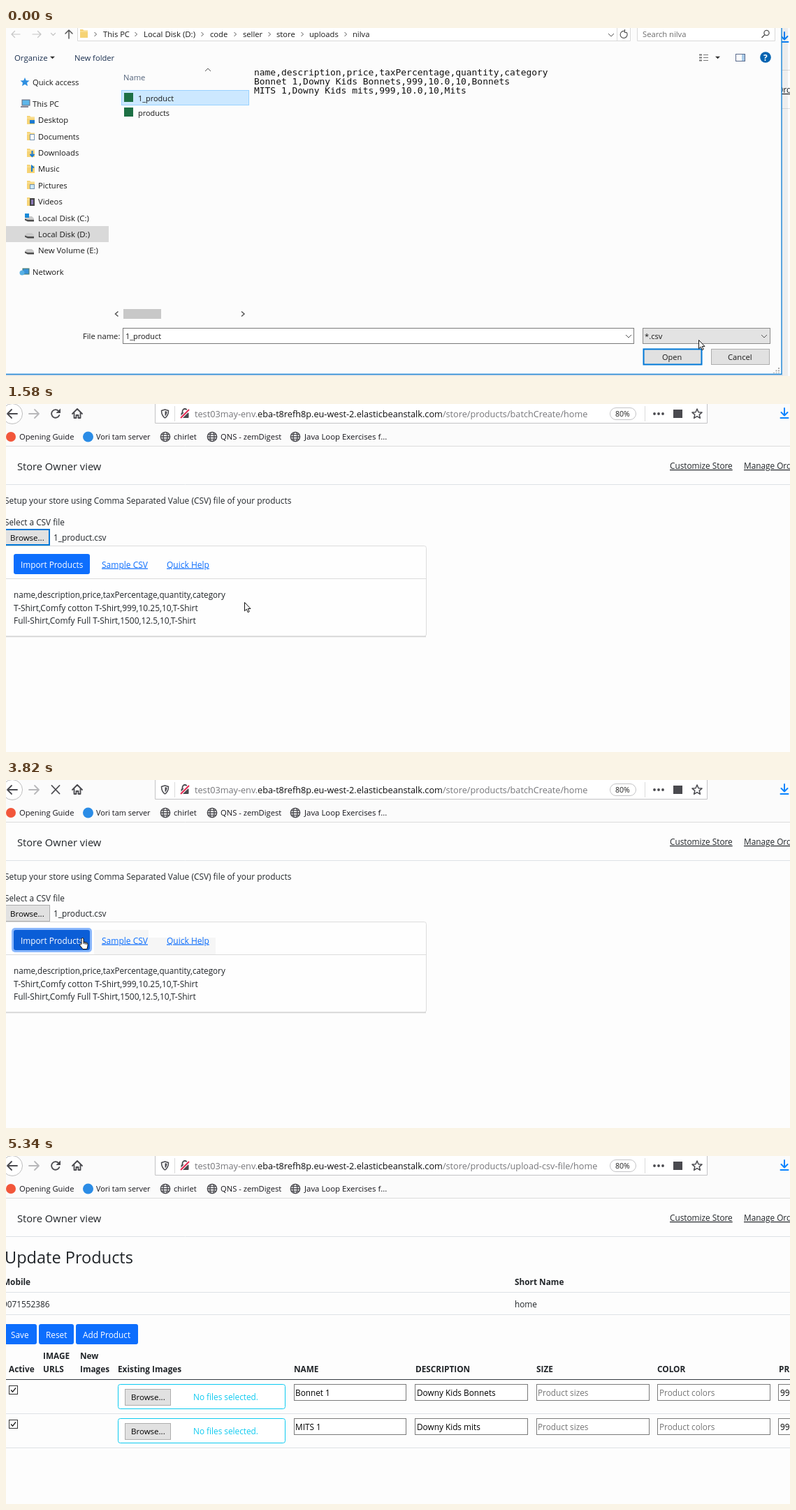
Animation of 1122x499 px, one loop 6010 ms. Source, as an HTML page:

```html
<!DOCTYPE html>
<html lang="en">
<head>
<meta charset="utf-8">
<title>Batch product upload</title>
<style>
html, body { margin: 0; width: 100%; height: 100%; overflow: hidden; background: #fdfdfd; }
svg { display: block; width: 1122px; height: 499px; }
text { font-family: "Open Sans", "Noto Sans", sans-serif; white-space: pre; }
.ui { font-size: 11.2px; fill: #191919; }
.files { font-size: 10.9px; }
.mono text { font: 12.95px "DejaVu Sans Mono", monospace; fill: #111; }
.marks { font-size: 11.2px; fill: #15141a; }
.url { font-size: 12.7px; fill: #76767a; }
.url tspan { fill: #0c0c0d; }
.page { font-size: 11.8px; fill: #212529; }
.csv { font-size: 11.95px; }
.bold { font-weight: 700; }
.link { text-decoration: underline; }
.blue { fill: #0d6efd; }
.white { fill: #fff; }
.hint { fill: #757575; }
.cyan { fill: #0dcaf0; }
.line { fill: none; stroke: #4a4a4f; stroke-width: 1.8; stroke-linecap: round; stroke-linejoin: round; }
.rule { stroke: #dee2e6; }
.thin { fill: none; stroke: #555; }

.step { animation: 6010ms step-end infinite; }
.dialog { animation-name: dialog; }
@keyframes dialog { 0% { opacity: 1 } 10.81%, 100% { opacity: 0 } }
.pressed { animation-name: pressed; }
@keyframes pressed { 0% { opacity: 0 } 8.48%, 100% { opacity: 1 } }
.picked { animation-name: picked; }
@keyframes picked {
  0% { fill: #cce8ff; stroke: #99d1ff }
  8.48%, 100% { fill: #d9d9d9; stroke: #d9d9d9 }
}
.combo { animation-name: combo; }
@keyframes combo { 0% { stroke: #8c8c8c } 1.99%, 100% { stroke: #adadad } }
.open { animation-name: open; }
@keyframes open {
  0% { fill: #e1e1e1; stroke: #0078d7; stroke-width: 2px }
  3.99% { fill: #e5f1fb; stroke: #0078d7; stroke-width: 1px }
  8.48%, 100% { fill: #cce4f7; stroke: #005499; stroke-width: 1px }
}
.before { animation-name: before; }
@keyframes before { 0% { opacity: 1 } 74.87%, 100% { opacity: 0 } }
.after { animation-name: after; }
@keyframes after { 0% { opacity: 0 } 74.87%, 100% { opacity: 1 } }
.import { animation-name: import; }
@keyframes import { 0% { fill: #0d6efd } 34.77%, 100% { fill: #0b5ed7 } }
.ring { animation-name: ring; }
@keyframes ring { 0% { opacity: 0 } 47.91%, 100% { opacity: 1 } }
.focus { animation-name: focus; }
@keyframes focus { 0% { opacity: 1 } 47.91%, 100% { opacity: 0 } }
.trail1 { animation-name: trail1; }
@keyframes trail1 { 0% { opacity: 0 } 30.78%, 100% { opacity: 1 } }
.trail2 { animation-name: trail2; }
@keyframes trail2 { 0% { opacity: 0 } 32.77%, 100% { opacity: 1 } }
.stop { animation-name: stop; }
@keyframes stop {
  0% { opacity: 0 } 49.91% { opacity: .3 } 52.41% { opacity: .6 } 54.9% { opacity: .85 }
  56.9% { opacity: 1 } 77.53% { opacity: .7 } 80.03% { opacity: .4 } 82.19% { opacity: .2 }
  84.69%, 100% { opacity: 0 }
}
.reload { animation-name: reload; }
@keyframes reload {
  0% { opacity: 1 } 49.91% { opacity: .6 } 52.41% { opacity: .3 } 54.9% { opacity: .1 }
  56.9% { opacity: 0 } 77.53% { opacity: .2 } 80.03% { opacity: .45 } 82.19% { opacity: .7 }
  84.69% { opacity: .9 } 88.85%, 100% { opacity: 1 }
}
.move { animation-name: move; }
@keyframes move {
  0% { transform: translate(991px, 447px) }
  1.99% { transform: translate(985px, 454px) }
  3.99% { transform: translate(968px, 465px) }
  5.99% { transform: translate(956px, 471px) }
  8.48% { transform: translate(954px, 471px) }
  22.29% { transform: translate(905px, 448px) }
  24.29% { transform: translate(640px, 362px) }
  26.28% { transform: translate(341px, 284px) }
  28.78% { transform: translate(302px, 262px) }
  30.78% { transform: translate(262px, 231px) }
  32.77% { transform: translate(165px, 227px) }
  34.77% { transform: translate(60px, 223px) }
  63.56% { transform: translate(105px, 226px) }
  65.72% { transform: translate(723px, 361px) }
  68.21% { transform: translate(815px, 408px) }
  70.21% { transform: translate(892px, 443px) }
  72.37% { transform: translate(923px, 456px) }
  74.87% { transform: translate(936px, 462px) }
  77.53% { transform: translate(969px, 472px) }
  80.03% { transform: translate(983px, 474px) }
  82.19%, 100% { transform: translate(991px, 474px) }
}
.arrow { animation-name: arrow; }
@keyframes arrow {
  0% { opacity: 1 } 30.78% { opacity: 0 } 65.72% { opacity: 1 } 84.69%, 100% { opacity: 0 }
}
.hand { animation-name: hand; }
@keyframes hand { 0% { opacity: 0 } 30.78% { opacity: 1 } 65.72%, 100% { opacity: 0 } }
</style>
</head>
<body>
<svg viewBox="0 0 1122 499">
<defs>
  <g id="globe" class="line" style="stroke-width:1.4">
    <circle r="6.6"/><ellipse rx="3" ry="6.6"/><path d="M-6.6 0H6.6M-5.6 -3.4H5.6M-5.6 3.4H5.6"/>
  </g>
  <path id="right" d="M-1.5 -3L1.5 0L-1.5 3" class="thin"/>
  <path id="down" d="M-4 -2L0 2L4 -2" class="thin"/>
  <path id="drop" d="M-3.5 -1.8H3.5L0 1.8Z" fill="#333"/>
  <g id="folder"><path d="M0 0H4L5.5 1.5H11V12H0Z" fill="#f6d374"/><path d="M0 3H11" stroke="#fbe7ab"/></g>
  <g id="disk"><path d="M0 4L3 1H10L13 4V7L10 8H3L0 6Z" fill="#c9c9c9"/><path d="M0 4.5L4 6H13V8.5H4L0 6.5Z" fill="#4c4c4c"/></g>
  <g id="row">
    <g fill="#fff" stroke="#7a7a7a">
      <rect x="412.5" y="327.5" width="160" height="23"/><rect x="585.5" y="327.5" width="161" height="23"/>
      <rect x="759.5" y="327.5" width="161" height="23"/><rect x="932.5" y="327.5" width="161" height="23"/>
      <rect x="1105.5" y="327.5" width="161" height="23"/>
    </g>
    <rect x="4.5" y="329.5" width="12" height="12" fill="#fff" stroke="#333"/>
    <path d="M7 335.5L9.5 338.2L14 332.5" fill="none" stroke="#222" stroke-width="1.3"/>
    <rect x="160.5" y="327.5" width="239" height="35" rx="3" fill="#fff" stroke="#0dcaf0"/>
    <rect x="170.5" y="334.5" width="65" height="23" fill="#e1e1e1" stroke="#adadad"/>
    <path d="M0 369.5H1122" class="rule"/>
    <g class="page">
      <text x="179" y="350" font-size="11.5" fill="#000">Browse...</text>
      <text x="268" y="350" class="cyan">No files selected.</text>
      <text x="761" y="344" class="hint">Product sizes</text><text x="935" y="344" class="hint">Product colors</text>
      <text x="1108" y="344" fill="#000">999</text>
    </g>
  </g>
</defs>

<rect width="1122" height="499" fill="#fdfdfd"/>

<!-- browser bars -->
<rect width="1122" height="60" fill="#fbfbfb"/>
<circle cx="9" cy="14" r="14.5" fill="#fff" stroke="#bdbdbd"/>
<path d="M16 14H2M8 8L2 14L8 20" class="line"/>
<path d="M33 14H47M41 8L47 14L41 20" class="line" style="stroke:#b8b8ba"/>
<g class="reload step">
  <path d="M76.3 16.2A5.8 5.8 0 1 1 75.2 10" class="line"/><path d="M78 6.5V13H71.5Z" fill="#4a4a4f"/>
</g>
<path d="M65.5 8L76.5 19.5M76.5 8L65.5 19.5" class="line stop step"/>
<path d="M95 14L102 7L109 14M97.5 13V20H100.5V16H103.5V20H106.5V13" class="line"/>
<path d="M213.5 -2V27.5H1003.5V-2" fill="#fff" stroke="#c4c4c6"/>
<path d="M227.5 8L232.5 9.5C232.5 15 230.5 18 227.5 20C224.5 18 222.5 15 222.5 9.5Z" class="line" style="stroke-width:1.5"/>
<path d="M227.5 10V17.5C229.5 16 230.3 14 230.4 11Z" fill="#4a4a4f"/>
<path d="M241.5 3V25M914.5 3V25" stroke="#dcdcdc"/>
<path d="M252.5 13V10.5A3.5 3.5 0 0 1 259.5 10.5V13" class="line"/>
<rect x="250.5" y="12.5" width="11" height="7.5" rx="1" fill="#4a4a4f"/>
<path d="M250 20L262 8" stroke="#fff" stroke-width="4"/><path d="M250 20L262 8" stroke="#e22850" stroke-width="2"/>
<rect x="864.5" y="5.5" width="37" height="17" rx="8.5" fill="#fff" stroke="#c4c4c6"/>
<text x="872" y="18" font-size="10.6" fill="#222">80%</text>
<g fill="#4a4a4f">
  <circle cx="928" cy="14" r="1.9"/><circle cx="934" cy="14" r="1.9"/><circle cx="940" cy="14" r="1.9"/>
  <rect x="955" y="8" width="13" height="12"/>
</g>
<path d="M989 7L991 11.7L996 12.1L992.2 15.4L993.4 20.3L989 17.7L984.6 20.3L985.8 15.4L982 12.1L987 11.7Z" class="line" style="stroke-width:1.5"/>
<path d="M1114 6V16M1109.5 12L1114 16.5L1118.5 12M1108.5 20H1119.5" class="line" style="stroke:#0a84ff;stroke-width:2"/>
<circle cx="7" cy="47" r="7" fill="#f2563a"/>
<circle cx="117.5" cy="47" r="7.5" fill="#2b8ce6"/>
<use href="#globe" x="228" y="47"/><use href="#globe" x="295" y="47"/><use href="#globe" x="414" y="47"/>
<g class="marks">
  <text x="19" y="51">Opening Guide</text><text x="129" y="51" font-size="10.9">Vori tam server</text>
  <text x="240" y="51">chirlet</text><text x="307" y="51">QNS - zemDigest</text>
  <text x="427" y="51" font-size="11.4">Java Loop Exercises f...</text>
</g>
<path d="M0 60.5H1122" stroke="#dcdcdc"/>

<g class="page">
  <text x="16" y="95" font-size="14.7">Store Owner view</text>
  <text x="950" y="93" class="link">Customize Store</text><text x="1056" y="93" class="link">Manage Orders</text>
</g>
<path d="M0 115.5H1122" class="rule"/>

<!-- upload page -->
<g class="before step">
  <text x="270" y="18.5" class="url">test03may-env.<tspan>eba-t8refh8p.eu-west-2.elasticbeanstalk.com</tspan>/store/products/batchCreate/home</text>
  <rect x="-3.5" y="203.5" width="605" height="129.5" rx="3" fill="#fff" fill-opacity=".5" stroke="#dcdcdc"/>
  <path d="M0 333.5H601" stroke="#d4d4d4" stroke-width="1.5"/>
  <path d="M0 250.5H602" stroke="#dcdcdc"/>
  <rect x="229" y="226" width="71" height="24" fill="#f6f6f6" class="trail1 step"/>
  <path d="M126 215H204V226H229V250H126Z" fill="#f6f6f6" class="trail2 step"/>
  <rect x="-4.5" y="179.5" width="67" height="23" fill="#e1e1e1" stroke="#adadad"/>
  <rect x="-4" y="180" width="66" height="22" fill="none" stroke="#0078d7" stroke-width="2" class="focus step"/>
  <rect x="8" y="212" width="115" height="35" rx="5" fill="#8bb8fc" class="ring step"/>
  <rect x="11" y="215" width="109" height="29" rx="3" class="import step"/>
  <g class="page">
    <text x="-2" y="143" font-size="11.9">Setup your store using Comma Separated Value (CSV) file of your products</text>
    <text x="-2" y="174">Select a CSV file</text>
    <text x="6" y="196" font-size="11.5" fill="#000">Browse...</text><text x="68" y="196">1_product.csv</text>
    <text x="21" y="234.5" class="white">Import Products</text>
    <text x="137" y="234.5" font-size="12" class="link blue">Sample CSV</text>
    <text x="230" y="234.5" font-size="12" class="link blue">Quick Help</text>
    <text x="11" y="277.5" font-size="11.7">name,description,price,taxPercentage,quantity,category</text>
    <g class="csv">
      <text x="11" y="296.5">T-Shirt,Comfy cotton T-Shirt,999,10.25,10,T-Shirt</text>
      <text x="11" y="315">Full-Shirt,Comfy Full T-Shirt,1500,12.5,10,T-Shirt</text>
    </g>
  </g>
</g>

<!-- product table -->
<g class="after step">
  <text x="270" y="18.5" class="url">test03may-env.<tspan>eba-t8refh8p.eu-west-2.elasticbeanstalk.com</tspan>/store/products/upload-csv-file/home</text>
  <g class="blue">
    <rect x="-4" y="241" width="48" height="29" rx="3"/><rect x="47" y="241" width="50" height="29" rx="3"/>
    <rect x="100" y="241" width="89" height="29" rx="3"/>
  </g>
  <path d="M0 195.5H1122M0 227.5H1122" class="rule"/>
  <path d="M0 320.5H1122" stroke="#343a40"/>
  <use href="#row"/><use href="#row" y="49"/>
  <g class="page">
    <text x="-2" y="154" font-size="23.55">Update Products</text>
    <g class="bold">
      <text x="-5" y="185">Mobile</text><text x="728" y="185">Short Name</text>
      <text x="4" y="309.5">Active</text><text x="53" y="291">IMAGE</text><text x="53" y="309.5">URLS</text>
      <text x="106" y="291">New</text><text x="106" y="309.5">Images</text><text x="160" y="309.5">Existing Images</text>
      <text x="412" y="309.5">NAME</text><text x="586" y="309.5">DESCRIPTION</text><text x="759" y="309.5">SIZE</text>
      <text x="932" y="309.5">COLOR</text><text x="1106" y="309.5">PRICE</text>
    </g>
    <text x="-5" y="217">9071552386</text><text x="728" y="217">home</text>
    <g class="white"><text x="7" y="260.5">Save</text><text x="57" y="260.5">Reset</text><text x="110" y="260.5">Add Product</text></g>
    <g fill="#000">
      <text x="414" y="344">Bonnet 1</text><text x="588" y="344">Downy Kids Bonnets</text>
      <text x="414" y="393">MITS 1</text><text x="588" y="393">Downy Kids mits</text>
    </g>
  </g>
</g>

<!-- file dialog -->
<g class="dialog step">
  <rect x="1110" width="9" height="499" fill="#000" opacity=".06"/>
  <rect y="497" width="1112" height="2" fill="#e4e4e4"/>
  <rect width="1110" height="497" fill="#fcfcfc"/>
  <path d="M0 496.5H1110V0" fill="none" stroke="#1a84d6" stroke-width="1.4"/>
  <g class="pressed step">
    <rect x="348" y="89" width="746" height="329" fill="#fff"/>
    <path d="M167 402H348V418H1094V484H165V418H167Z" fill="#f0f0f0"/>
  </g>

  <g class="line" style="stroke-width:1.2;stroke:#c6c6c6">
    <path d="M20 9H8M12.5 4.5L8 9L12.5 13.5M38 9H50M45.5 4.5L50 9L45.5 13.5M64.5 7.5L67.5 10.5L70.5 7.5"/>
    <path d="M90 15V3M85 8L90 3L95 8" stroke="#555" stroke-width="1.5"/>
  </g>
  <path d="M102.5 -2V18.5H893.5V-2M874.5 -2V18M903.5 -2V18.5H1100.5V-2" fill="#fff" stroke="#d9d9d9"/>
  <use href="#folder" x="106" y="2"/>
  <use href="#right" x="128" y="9"/><use href="#right" x="186" y="9"/><use href="#right" x="281" y="9"/>
  <use href="#right" x="328" y="9"/><use href="#right" x="377" y="9"/><use href="#right" x="424" y="9"/><use href="#right" x="486" y="9"/>
  <use href="#down" x="866" y="10"/>
  <path d="M888.5 7A5 5 0 1 1 885 4.5M885.5 2V6.5H889" class="thin" stroke-width="1.2"/>
  <circle cx="1088.5" cy="7" r="3.6" class="thin" stroke-width="1.3"/><path d="M1086 9.5L1081.5 14" class="thin" stroke-width="1.6"/>

  <g fill="none" stroke="#777">
    <path d="M992 38.5H996M992 42.5H996M992 46.5H996" stroke-width="2"/><path d="M998 38.5H1005M998 42.5H1005M998 46.5H1005"/>
    <rect x="1044.5" y="37.5" width="13" height="10" stroke="#5a6b8c"/>
  </g>
  <rect x="1053" y="38" width="4" height="9" fill="#a9cbe8"/>
  <use href="#drop" x="66.5" y="42.5"/><use href="#drop" x="1018.5" y="42.5"/>
  <circle cx="1087" cy="42" r="7.8" fill="#0063b1"/>
  <text x="1084" y="46.5" font-size="12" class="white bold">?</text>

  <rect y="284" width="147" height="23" fill="#d9d9d9"/>
  <path d="M27 71L28.8 75.3L33.5 75.6L30 78.6L31 83.3L27 80.7L23 83.3L24 78.6L20.5 75.6L25.2 75.3Z" fill="#2f8fe0"/>
  <rect x="23" y="103" width="11" height="8" fill="#5fb6ea" stroke="#667"/><path d="M21 113H32" stroke="#889" stroke-width="2"/>
  <use href="#folder" x="30" y="126"/><rect x="34" y="132" width="7" height="5" fill="#1a7ad0"/>
  <use href="#folder" x="30" y="149"/><rect x="34.5" y="152.5" width="6" height="8" fill="#fff" stroke="#7593ad"/>
  <use href="#folder" x="30" y="173"/><path d="M37.5 176V184M34.5 181L37.5 184L40.5 181" fill="none" stroke="#1a7ad0" stroke-width="2"/>
  <use href="#folder" x="30" y="196"/><path d="M37 206V198L40 200.5" fill="none" stroke="#1a7ad0" stroke-width="2"/>
  <use href="#folder" x="30" y="219"/><rect x="34.5" y="224.5" width="6" height="6" fill="#cde8f7" stroke="#7593ad"/>
  <use href="#folder" x="30" y="243"/><rect x="34" y="244" width="7" height="11" fill="#444"/><rect x="36" y="246" width="3" height="7" fill="#8a78b8"/>
  <use href="#disk" x="27" y="269"/><rect x="27" y="266" width="6" height="6" fill="#1a8ad8"/>
  <use href="#disk" x="27" y="293"/><use href="#disk" x="27" y="316"/>
  <rect x="24" y="345" width="9" height="8" fill="#3a93d8" stroke="#476"/><circle cx="23" cy="351" r="3.5" fill="#58b0e4"/>

  <rect x="165.5" y="89.5" width="182" height="21" class="picked step"/>
  <rect x="169" y="93" width="13" height="13" fill="#1d7044"/><rect x="169" y="114" width="13" height="13" fill="#1d7044"/>
  <path d="M285 62L289 58L293 62" class="thin"/>
  <rect x="168" y="403" width="54" height="14" fill="#c8c8c8"/>
  <path d="M160.5 406.5L156.5 410L160.5 413.5M337 406.5L341 410L337 413.5" class="thin" stroke-width="1.5"/>

  <rect x="167.5" y="430.5" width="731" height="22" fill="#fff" stroke="#7a7a7a"/>
  <rect x="911.5" y="430.5" width="182" height="22" fill="#e3e3e3" class="combo step"/>
  <use href="#down" x="891" y="442"/><use href="#down" x="1085" y="442"/>
  <rect x="912.5" y="460.5" width="83" height="22" class="open step"/>
  <rect x="1009.5" y="460.5" width="83" height="22" fill="#e1e1e1" stroke="#adadad"/>
  <path d="M1106 487V495M1102.5 490.5V495M1099 494V495" stroke="#aaa" stroke-width="2" stroke-dasharray="2 1.5"/>

  <g class="ui">
    <text x="139" y="12.5">This PC</text><text x="197" y="12.5" font-size="11.4">Local Disk (D:)</text><text x="292" y="12.5">code</text>
    <text x="339" y="12.5">seller</text><text x="387" y="12.5">store</text><text x="434" y="12.5">uploads</text><text x="496" y="12.5">nilva</text>
    <text x="911" y="12.5" fill="#6d6d6d">Search nilva</text>
    <text x="12" y="46.5" fill="#1b3050" font-size="11.4">Organize</text><text x="98" y="46.5" fill="#1b3050">New folder</text>
    <text x="38" y="81.5">Quick access</text><text x="38" y="112.5">This PC</text><text x="46" y="136">Desktop</text>
    <text x="46" y="159.5" font-size="11">Documents</text><text x="46" y="183">Downloads</text><text x="46" y="206">Music</text>
    <text x="46" y="229.5">Pictures</text><text x="46" y="253">Videos</text>
    <g font-size="11.4">
      <text x="46" y="276.5">Local Disk (C:)</text><text x="46" y="300">Local Disk (D:)</text><text x="46" y="323">New Volume (E:)</text>
    </g>
    <text x="38" y="354">Network</text>
    <text x="168" y="75" fill="#52627a">Name</text>
    <g class="files"><text x="189" y="104.5">1_product</text><text x="189" y="125.5">products</text><text x="171" y="446">1_product</text></g>
    <text x="110" y="446">File name:</text><text x="914" y="446">*.csv</text>
    <text x="939" y="475.5" font-size="11">Open</text><text x="1033" y="475.5">Cancel</text>
  </g>
  <g class="mono">
    <text x="355" y="67.5">name,description,price,taxPercentage,quantity,category</text>
    <text x="355" y="80.8">Bonnet 1,Downy Kids Bonnets,999,10.0,10,Bonnets</text>
    <text x="355" y="94">MITS 1,Downy Kids mits,999,10.0,10,Mits</text>
  </g>
</g>

<!-- pointer -->
<g class="move step" fill="#fff" stroke="#111" stroke-linejoin="round">
  <path class="arrow step" d="M.5 .5V12.8L3.3 10.2L5.2 14.7L7.2 13.8L5.3 9.5H9Z"/>
  <path class="hand step" d="M3 9.5V2A1.5 1.5 0 0 1 6 2V6.2L10.5 7.2Q12 7.7 12 9.3V12L10.8 16.5H5L1 11.5Q0 9.7 1.5 9Q2.3 8.8 3 9.5ZM6 6.2V9M8 7V9.5M10 7.5V10"/>
</g>
</svg>
</body>
</html>
```
